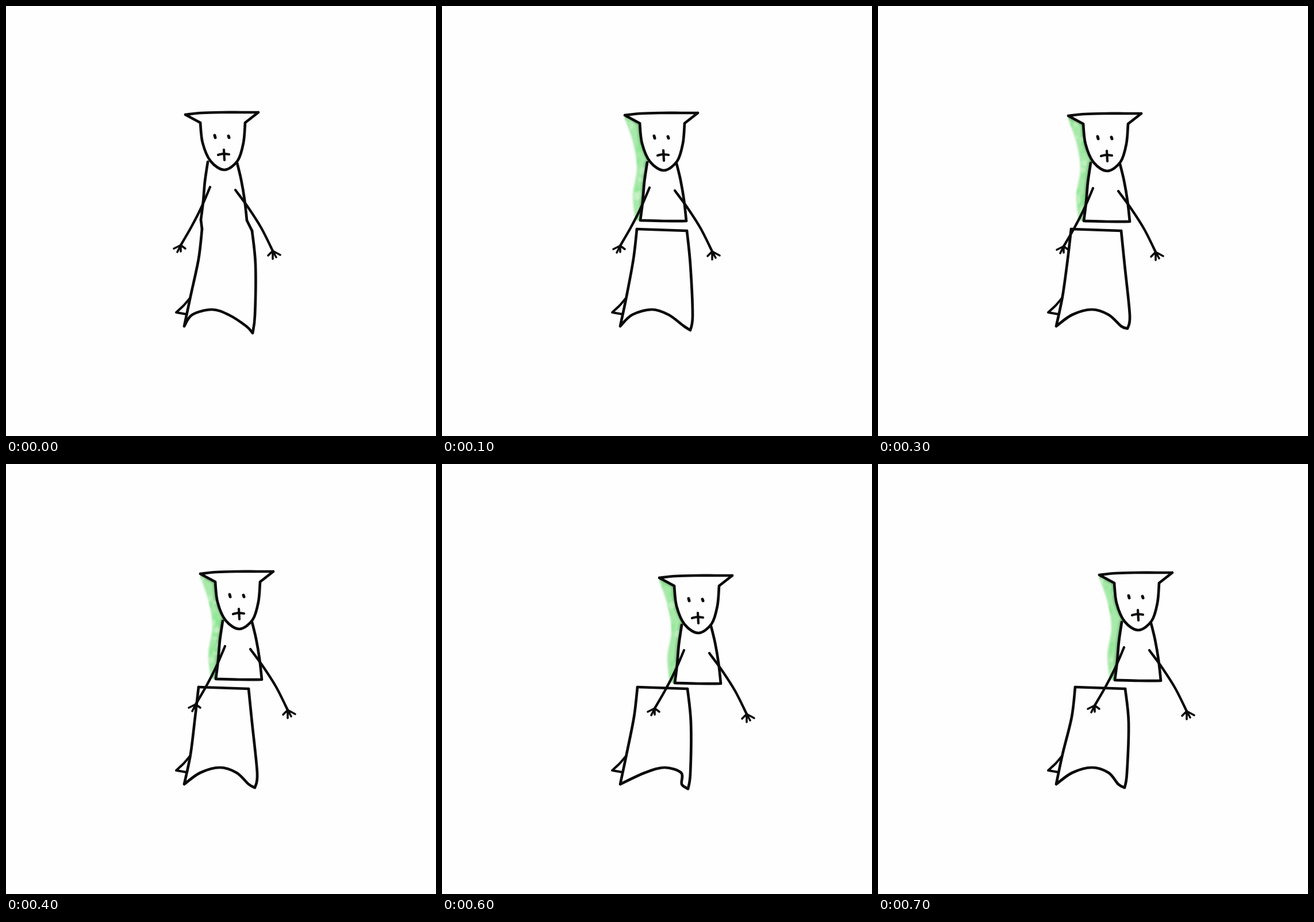
Write an HTML page with a canvas that moves like this. It is 748 px wide and 748 px high and loops after 800 ms.

```html
<!DOCTYPE html>
<html lang="en">
<head>
<meta charset="utf-8">
<title>Sliding in half</title>
<style>
  html, body { margin: 0; width: 100%; height: 100%; overflow: hidden; background: #fefefe; }
  canvas { display: block; width: 748px; height: 748px; }
</style>
</head>
<body>
<canvas id="stage" width="748" height="748"></canvas>
<script>
const ctx = document.getElementById('stage').getContext('2d');
const STEP = 100, INK = '#0a0a0a', PAPER = '#fefefe';

// One row per drawing: chin x, chin y, skirt top x, hem peak x, right foot x, right foot y
const POSES = [
  [380, 285, 341, 358, 429, 569],
  [386, 286, 339, 365, 432, 564],
  [392, 288, 337, 372, 434, 559],
  [399, 287, 336, 372, 434, 561],
  [406, 287, 335, 372, 433, 563],
  [433, 290, 340, 373, 430, 566],
  [446, 294, 340, 387, 428, 565],
  [453, 289, 343, 372, 429, 563]
];

// The upper half is one rigid figure, measured from the chin.
const hatL = [-68, -96], hatR = [59, -100], earL = [-42, -82], earR = [36, -82];
const waistL = [-41, 87], waistR = [39, 88];
const FIGURE = {
  head: [
    [hatL, [-40, -99], [-4, -100], [30, -100], hatR],
    [hatR, earR],
    [earR, [33, -47], [23, -16], [0, 0], [-24, -15], [-38, -47], earL],
    [earL, hatL]
  ],
  eyes: [[[-17, -60], [-16, -56]], [[7, -59], [8, -56]]],
  mouth: [[[-11, -26], [-2, -28], [8, -27]], [[-1, -35], [0, -17]]],
  left: [[-29, -14], [-34, 20], [-37, 55], waistL],
  right: [waistR, [35, 52], [29, 17], [22, -12]],
  waist: [waistL, [0, 88], waistR],
  armL: [[-25, 30], [-41, 67], [-58, 100], [-76, 131]],
  armR: [[19, 35], [41, 65], [64, 101], [84, 141]],
  shade: [[-68, -90], [-54, -50], [-47, -4], [-54, 42], [-50, 86]]
};
const FINGERS_L = [[-12, 6], [-6, 12], [0, 11], [8, 6]];
const FINGERS_R = [[-8, 8], [0, 14], [6, 11], [13, 7]];

// Catmull-Rom spline; joined strokes form one fillable outline
function trace(strokes, join) {
  const path = new Path2D();
  strokes.forEach((pts, n) => {
    path[join && n ? 'lineTo' : 'moveTo'](...pts[0]);
    for (let i = 0; i < pts.length - 1; i++) {
      const a = pts[i - 1] || pts[i], b = pts[i], c = pts[i + 1], d = pts[i + 2] || c;
      path.bezierCurveTo(b[0] + (c[0] - a[0]) / 6, b[1] + (c[1] - a[1]) / 6,
        c[0] - (d[0] - b[0]) / 6, c[1] - (d[1] - b[1]) / 6, c[0], c[1]);
    }
  });
  return path;
}
function ink(strokes, width) {
  ctx.lineWidth = width;
  ctx.strokeStyle = INK;
  ctx.stroke(trace(strokes));
}
function cover(strokes) {
  ctx.fillStyle = PAPER;
  ctx.fill(trace(strokes, true));
}
function random(seed) {
  return () => (seed = (seed * 16807) % 2147483647) / 2147483647;
}

function crayon(seed) {
  const edge = FIGURE.shade;
  const inner = [[...FIGURE.left].reverse(), FIGURE.head[2].slice(4), FIGURE.head[3]];
  const area = trace([edge, ...inner], true);
  const rnd = random(seed * 977 + 31);
  ctx.save();
  ctx.filter = 'blur(1.6px)';
  ctx.fillStyle = '#a6e9a8';
  ctx.fill(area);
  ctx.clip(area);
  ctx.strokeStyle = 'rgba(55,120,60,.4)';
  ctx.lineWidth = 9;
  ctx.stroke(trace(inner));
  for (let i = 0; i < 22; i++) {
    const [x, y] = edge[Math.floor(rnd() * edge.length)];
    ctx.fillStyle = i % 2 ? 'rgba(125,232,135,.5)' : 'rgba(225,250,222,.4)';
    ctx.beginPath();
    ctx.ellipse(x + rnd() * 16, y + (rnd() - 0.5) * 40, 2 + rnd() * 3, 3 + rnd() * 5, 0.3, 0, 7);
    ctx.fill();
  }
  ctx.restore();
}

function arm(limb, fingers) {
  const wrist = limb[limb.length - 1];
  ink([limb], 4.3);
  ink(fingers.map(([x, y]) => [wrist, [wrist[0] + x, wrist[1] + y]]), 3.6);
}

function drawSkirt(top, peak, footX, footY, split) {
  const a = [top, 388], b = [top + 87, 391], footL = [310, 557], footR = [footX, footY];
  ink([
    [a, [top - 6, 440], [321, 505], footL],
    [footL, [peak - 34, 537], [peak, 528], [peak + 29, 537], [footX - 11, 557], footR],
    [footR, [footX + 4, 538], [top + 93, 450], b]
  ], 4.7);
  if (split) ink([[a, b]], 4.7);
  ink([[[320, 508], [309, 521], [296, 533]], [[296, 533], [313, 536]]], 4);
  return [a, b];
}

function drawFigure(split, seed) {
  const { head, eyes, mouth, left, right, waist, armL, armR } = FIGURE;
  if (split) crayon(seed);
  cover([left, right]);
  cover(head);
  ink(split ? [left, waist, right] : [left, right], 4.7);
  ink(head, 4.7);
  ink(eyes, 5);
  ink(mouth, 4.2);
  arm(armL, FINGERS_L);
  arm(armR, FINGERS_R);
}

function draw(index) {
  const [x, y, top, peak, footX, footY] = POSES[index], split = index > 0;
  ctx.fillStyle = PAPER;
  ctx.fillRect(0, 0, 748, 748);
  ctx.lineCap = ctx.lineJoin = 'round';
  const [a, b] = drawSkirt(top, peak, footX, footY, split);
  if (!split) ink([[[x + waistL[0], y + waistL[1]], a], [[x + waistR[0], y + waistR[1]], b]], 4.7);
  ctx.save();
  ctx.translate(x, y);
  drawFigure(split, index);
  ctx.restore();
}

const start = performance.now();
let shown = -1;
function tick() {
  const index = Math.floor((performance.now() - start) / STEP) % POSES.length;
  if (index !== shown) draw(shown = index);
  requestAnimationFrame(tick);
}
tick();
</script>
</body>
</html>
```
